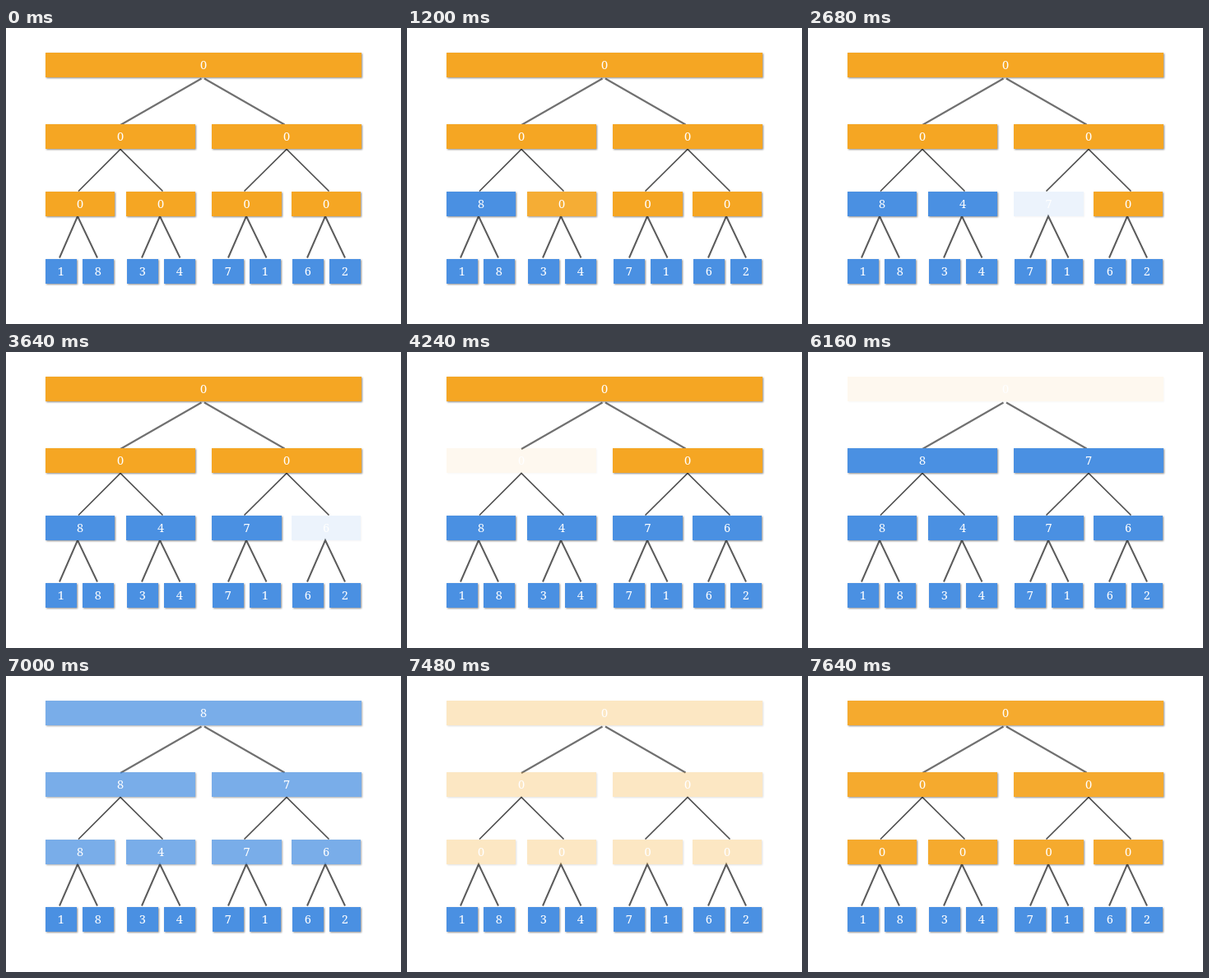
Animation, 480 px wide and 360 px high, one loop 7720 ms. Source, as an HTML page:

```html
<!DOCTYPE html>
<html lang="en">
<head>
<meta charset="utf-8">
<title>Tournament tree</title>
<style>
  html, body { margin: 0; width: 100%; height: 100%; overflow: hidden; background: #fff; }
  #stage { position: relative; width: 480px; height: 360px; overflow: hidden; }
  svg { position: absolute; left: 0; top: 0; }
  .box {
    position: absolute;
    height: 29.5px;
    color: #fff;
    font: 14.5px/29px "Noto Serif", "Liberation Serif", serif;
    text-align: center;
    box-shadow: .5px 1px 2px rgba(0, 0, 0, .45);
  }
  .open { background: #f5a623; }
  .done { background: #4a90e2; }
</style>
</head>
<body>
<div id="stage">
  <svg width="480" height="360" fill="none" stroke="#5c5c5c">
    <path stroke="#707070" stroke-width="2.1" d="M237.5 61.5L139 118M241 61.5L338.5 117.5"/>
    <path stroke="#505050" stroke-width="1.7" d="M88 198.5L139 147.5L190.5 198.5M289.5 198.5L341 147.5L392.5 198.5"/>
    <path stroke-width="2" d="M65 279.5L87 229L111 279.5M165 279.5L187 229L211.5 279.5M270 279.5L292 229L316.5 279.5M366 279.5L388 229L412 279.5"/>
  </svg>
</div>
<script>
const LOOP = 7720, TICK = 40, CLEAR = 7000, RESET = 7480;
const stage = document.getElementById('stage');

// x, y, width, winner, in the order they are decided
const nodes = [
  [48, 199, 84, 8], [146, 199, 84, 4], [250, 199, 85, 7], [347, 199, 84, 6],
  [48, 117, 182, 8], [250, 117, 182, 7], [48, 30, 384, 8]
];
// x, value
const leaves = [[48, 1], [93, 8], [147, 3], [192, 4], [251, 7], [296, 1], [348, 6], [393, 2]];

function addBox(kind, x, y, w, text) {
  const el = document.createElement('div');
  el.className = 'box ' + kind;
  el.style.cssText = `left:${x}px;top:${y}px;width:${w}px`;
  el.textContent = text;
  return stage.appendChild(el);
}

// Opacity levels, one per tick, as [time, level]
const ramp = (start, from, step, count) => Array.from({ length: count }, (_, i) =>
  [start + i * TICK, Math.min(1, from + i * step)]);
const fadeOut = (start, count) => ramp(start, count === 6 ? .92 : .74, -.1675, count);
const fadeIn = start => ramp(start, .1, .167, 7);

function play(el, levels) {
  const last = levels[levels.length - 1][1];
  const frames = [...levels, [LOOP, last]].map(([t, opacity]) =>
    ({ offset: t / LOOP, opacity, easing: 'steps(1, end)' }));
  el.animate(frames, { duration: LOOP, iterations: Infinity });
}

leaves.forEach(([x, value]) => addBox('done', x, 281, 37.5, value));

nodes.forEach(([x, y, w, winner], i) => {
  const leave = 240 + 960 * i, enter = leave + 520;
  play(addBox('open', x, y, w, 0),
    [[0, 1], ...fadeOut(leave, i < 4 ? 6 : 5), [enter, 0], ...ramp(RESET, .27, .17, 5)]);
  play(addBox('done', x, y, w, winner),
    [[0, 0], ...fadeIn(enter), ...fadeOut(CLEAR, 5), [RESET, 0]]);
});
</script>
</body>
</html>
```
